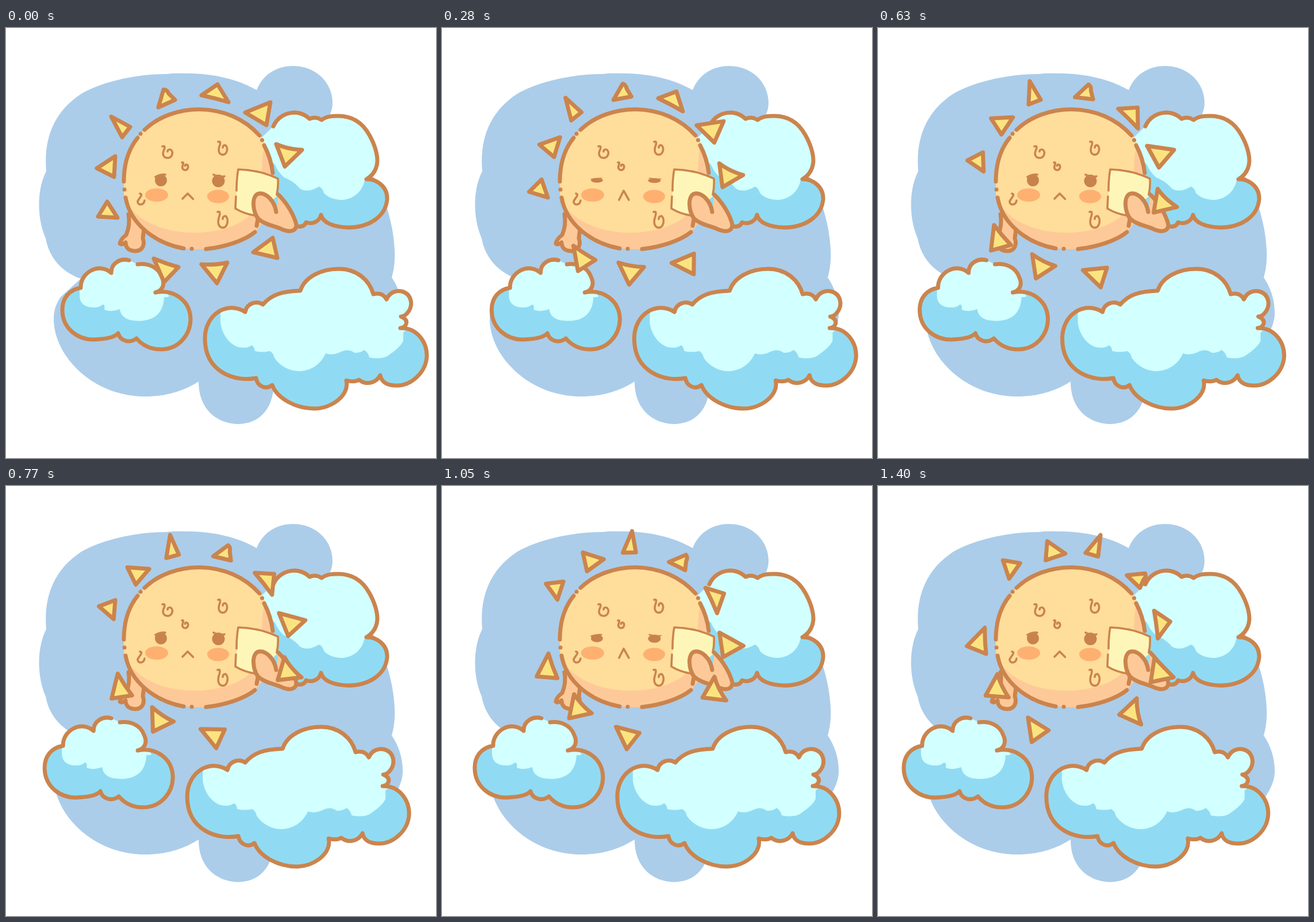
An HTML page that plays this animation: 748 px wide and 748 px high, repeating every 1470 ms.

```html
<!DOCTYPE html>
<html lang="en">
<head>
<meta charset="utf-8">
<title>Hot sun</title>
<style>
  html, body { margin: 0; height: 100%; overflow: hidden; background: #fff; }
  svg { display: block; width: 100vw; height: 100vh; }
  .line { fill: none; stroke: #cb844d; stroke-width: 7; stroke-linecap: round; stroke-linejoin: round; }
  .thin { stroke-width: 3.6; }
  .skin { fill: #fec998; }
  #rays { fill: #fbe480; }
  #drops path { vector-effect: non-scaling-stroke; }
</style>
</head>
<body>
<svg viewBox="0 0 748 748">
  <defs>
    <clipPath id="disc"><path d="M241 177C265 154 300 141.500 337 141.500C378 142 415 158 441 187C457 205 464 235 464 262C464 295 455 335 433 355C415 370 380 385 335 385C270 384 216 350 206 295C202 255 210 207 241 177Z"/></clipPath>
  </defs>

  <path fill="#abcdea" d="M320 79C365 80 405 90 436 108C446 82 470 66 499 66C539 66 568 95 568 130C568 147 560 160 548 170L640 260C662 300 674 345 676 385C677 405 675 420 671 434C684 453 691 476 690 500C688 530 660 560 640 580L466 622C463 665 440 688 404 689C365 688 335 662 335 615C305 634 275 641 240 641C150 640 83 570 83 506C83 490 88 478 95 468L130 436C98 425 75 400 69 366C53 330 54 280 70 249C65 190 85 145 130 115C170 92 230 80 280 80C292 78 308 79 320 79Z"/>

  <g id="rightCloud"></g>

  <path class="line skin" d="M213 324C216 340 212 353 209 360C202 365 199 370 198 375C201 378 205 375 208 373C208 384 216 388 226 388C238 387 242 376 238 366L240 350"/>

  <g clip-path="url(#disc)">
    <path class="skin" d="M190 130h290v270h-290z"/>
    <path fill="#ffdd9a" d="M190 130H480L452 206C444 218 447 232 445 245C444 290 434 315 420 330C395 349 360 356 326 356C275 356 225 335 208 300L190 280Z"/>
  </g>
  <path class="line" d="M208 295C216 340 258 374 309 383.500M348 384.500C380 381 415 370 433 355M436 344L438 333M464 252C462 235 457 219 449 204M441 187C415 158 378 142 337 141.500C300 141.500 265 154 241 177M229 191C212 212 205 238 205 267M206 281h.1M234 184h.1M323 384h.1M445.500 195h.1"/>

  <g fill="#feb071">
    <ellipse cx="262" cy="290.500" rx="20" ry="11.500"/>
    <ellipse cx="369" cy="293" rx="19" ry="11.500"/>
  </g>
  <g id="eyes" fill="#c8824c">
    <circle cx="269.500" cy="265" r="10.500"/>
    <circle cx="369.500" cy="266" r="11"/>
    <path class="line thin" d="M260 259Q268 254 277 255M361 255Q370 260 380 258"/>
  </g>
  <path id="mouth" class="line thin"/>
  <g id="drops" class="line thin"></g>

  <path fill="#fef6b8" d="M404 246Q442 247 474 262L471 293 432 326Q413 323 399 315Z"/>
  <path class="line thin" d="M401 283Q401 262 404 246Q442 247 473 262Q474 276 471 290M400 293L399 314Q414 323 432 326"/>
  <path class="line skin" d="M470 320C467 299 451 286 440 288C426 291 429 321 439 332C451 343 472 345 482 351C495 356 505 353 505 342C501 325 489 305 474 290"/>

  <g id="leftCloud"></g>
  <g id="bigCloud"></g>
  <path id="rays" class="line"/>
</svg>

<script>
const $ = id => document.getElementById(id);

function cloud(id, outline, shade, extra = '') {
  $(id).innerHTML = `
    <clipPath id="${id}Clip"><path d="${outline}${extra}"/></clipPath>
    <path fill="#90dbf3" d="${outline}${extra}"/>
    <path fill="#d2ffff" clip-path="url(#${id}Clip)" d="${shade}"/>
    <path class="line" d="${outline}"/>`;
}

cloud('rightCloud',
  'M465 171C472 155 487 147 503 147C515 148 522 152 528 158Q539 153 549 160C558 153 569 153 578 153C606 153 622 168 632 186C642 204 646 219 646 232C645 246 639 256 627 263C643 262 664 275 663 298C660 330 629 347 595 347C570 346 551 339 548 325C545 337 533 342 522 338Q518 347 507 345',
  'M430 120V200L468 238Q474 252 484 260Q500 266 511 279Q524 288 544 276Q550 277 553 287C562 297 575 299 586 299C605 297 620 285 624 264L680 240V120Z',
  'L470 330 440 195Z');

cloud('leftCloud',
  'M214 404C200 400 183 408 183 426C162 407 129 425 130 452C109 455 98 471 98 490C98 524 126 542 152 542C172 541 188 539 195 531C199 545 215 549 227 540C239 554 253 559 269 559C301 559 321 533 321 506C320 473 291 454 260 460C273 457 277 445 271 433C264 414 245 409 229 411',
  'M128 390V465C128 478 136 486 152 486Q162 487 168 481Q173 482 171 490Q184 495 198 489Q200 504 216 508C250 514 274 502 275 468Q280 469 284 467L278 458 320 390Z');

cloud('bigCloud',
  'M686 522C714 521 732 545 732 570C731 600 704 622 680 622C665 622 653 617 651 604C645 616 628 623 614 612Q605 617 592 613C598 640 565 662 536 662C505 662 472 645 463 621C452 630 437 623 435 609C400 616 346 600 346 540C346 498 385 474 416 494C419 478 436 474 447 481C461 464 480 458 512 457C520 432 550 419 579 419C610 419 632 438 639 463Q655 459 662 472C667 460 678 456 688 458C705 462 710 482 698 496Q693 502 687 502Q699 507 696 515Q694 521 686 522',
  'M373 400V512C376 538 395 556 411 556Q421 557 427 552Q431 552 433 562Q446 565 459 562Q465 565 467 574C478 590 495 597 511 597C530 596 547 586 556 566Q566 570 579 565Q595 556 606 565Q618 565 623 560Q630 564 632 573Q651 577 663 571C678 561 688 552 691 544V530L700 522 740 400Z');

// x, y, scale x, scale y
$('drops').innerHTML = [
  [272, 206, 1, 1], [369, 198, .9, 1.12], [306, 234, .62, .66], [368, 320, 1, 1.37]
].map(([x, y, sx, sy]) =>
  `<path transform="translate(${x} ${y}) scale(${sx} ${sy})" d="M0 0C6-2 4 4 2 8C-1 17 5 20 9 20C17 20 19 11 16 7C14 4 9 5 9 9"/>`
).join('') + '<path d="M233 288C240 290 230 297 229 302C229 309 240 309 241 300"/>';

$('rays').setAttribute('d', [
  '274 107Q280 107 283 114L294 125 265 138', '183 154L216 172 202 190',
  '368 98L387 129Q364 122 340 117', '460 129L453 169 416 147',
  '470 202Q490 211 515 212L485 241', '464 365L472 400 430 390',
  '340 411Q364 413 385 408L367 444', '257 401Q278 410 300 416L275 442',
  '176 302L160 328 194 330', '190 223L158 244 188 259'
].map(p => `M${p}Z`).join(''));

const STEP = 70, STEPS = 21;
const BLINK = [.65, .38, .38, .68];

function draw(now) {
  const n = Math.floor(now / STEP) % STEPS;
  const drift = .0155 * n * n - 2.97 * n;
  for (const id of ['leftCloud', 'bigCloud'])
    $(id).setAttribute('transform', `translate(${drift} 0)`);
  $('rays').setAttribute('transform', `rotate(${3.4 * n} 336 271)`);

  // two blinks per loop, twelve steps apart
  const blink = (n + 9) % 12;
  const open = BLINK[blink] ?? 1;
  $('eyes').setAttribute('transform', `translate(0 265) scale(1 ${open}) translate(0 -265)`);
  $('mouth').setAttribute('d', blink < 3 ? 'M308 299L316 283 325 299' : 'M307 297L316 288 325.500 297.500');
  requestAnimationFrame(draw);
}
requestAnimationFrame(draw);
</script>
</body>
</html>
```
